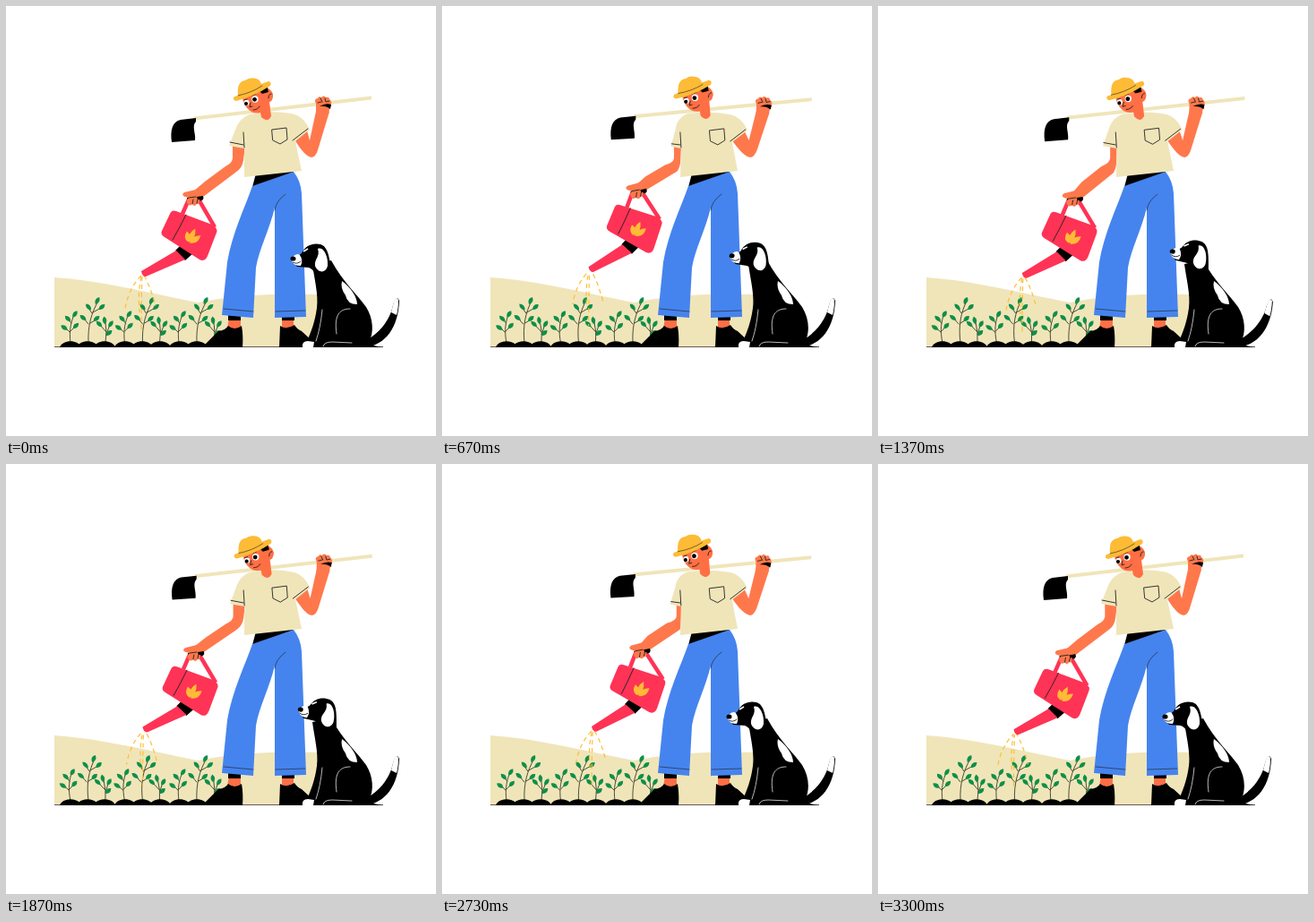
These frames come from a looping animation (480 by 480 pixels, 3.33 s). An HTML page:

```html
<!DOCTYPE html>
<html lang="en">
<head>
<meta charset="utf-8">
<title>Gardener and dog</title>
<style>
html, body { margin: 0; width: 100%; height: 100%; overflow: hidden; background: #fff; }
svg { display: block; width: 100vw; height: 100vh; }
.skin { fill: #ff6f45; }
.arm { fill: #ff784c; }
.cloth { fill: #f0e5b9; }
.blue { fill: #4584ee; }
.red { fill: #ff3355; }
.gold { fill: #fdbb36; }
.white { fill: #fff; }
.line { fill: none; stroke: #222; stroke-width: .9; stroke-linecap: round; stroke-linejoin: round; }
.pale { stroke: #ccc; }
.stem { stroke: #38402b; }
.leaf { fill: #0e8f49; }
#water path { fill: none; stroke: #fdbf35; stroke-width: 1.2; stroke-dasharray: 5 4; }
</style>
</head>
<body>
<svg viewBox="0 0 480 480">
  <path class="cloth" d="M54 303C103 306 154 319 214 331C250 324 292 320 350 322V380H54Z"/>
  <g id="plants"></g>
  <path d="M54 380.5H421" stroke="#6a5658"/>
  <g id="soil"></g>

  <g id="water">
    <path d="M151 301Q137 315 133 338"/>
    <path d="M151 302Q147 320 149 342"/>
    <path d="M152 302Q151 325 151 362"/>
    <path d="M154 301Q161 312 167 335"/>
  </g>

  <g id="hoe">
    <path class="cloth" d="M210 123.5L408 100.5V104.5L210 127.5Z"/>
    <path d="M212 125L195 127C186 129 183 138 185 152L211 150C212 142 207 134 212 129Z"/>
  </g>

  <!-- legs -->
  <path class="skin" d="M249 348H262V360H247ZM308 348H321V360H308Z"/>
  <path d="M248 345H262V351H248ZM308 345H322V351H308ZM219 381L237 363Q245 362 248 357Q255 363 263 357Q265 368 264 381ZM305 381L306 357Q313 362 322 356Q325 361 330 363L343 375L345 381Z"/>
  <path class="line" stroke-opacity=".4" d="M239 365L243 368M236 368L240 371M325 364L322 367M329 367L325 370"/>
  <path d="M279 187L275 202L321 186V183Z"/>
  <path class="blue" d="M275 201L321 185Q329 195 330 209L335 347L300 348V225C294 250 283 270 279 292L276 348L241 345L247 286C252 255 267 224 275 201Z"/>
  <path class="line" stroke-opacity=".7" d="M300 228Q301 218 312 210M243 338L276 341M301 341L334 340"/>

  <!-- upper body -->
  <path class="arm" id="armL"/>
  <path class="arm" id="armR"/>
  <path class="cloth" id="shirt"/>
  <path class="line" id="seams"/>

  <g id="head">
    <path class="skin" d="M264 103L291 91Q298 94 298 101Q297 107 294 107L296 123Q292 131 285 124L284 119Q276 121 270 115Q265 110 264 103Z"/>
    <path d="M281 93L291 88L293 96L286 98Z"/>
    <path class="skin" d="M291 98Q297 92 298 100Q297 107 292 107Z"/>
    <ellipse class="white" cx="268.5" cy="108" rx="3" ry="3.3"/>
    <ellipse class="white" cx="278" cy="104" rx="3.7" ry="3.7"/>
    <circle cx="268" cy="109" r="2.1"/>
    <circle cx="277.5" cy="104.3" r="2.4"/>
    <path class="line" d="M273 108L272 113L275 112M276 116Q281 116 283 112M266 105L269 104M275 100L279 98M293 103Q293 98 296 98"/>
    <path class="gold" d="M259 100C258 88 261 84 267 83Q271 80 275 80.500Q283 80 285 87L293 84Q297 85 295 89Q277 101 257 106Q252 105 255 101Z"/>
    <path class="line" stroke-opacity=".65" d="M259 100Q274 97 286 89"/>
  </g>

  <g id="fist">
    <path class="arm" d="M346 109Q343 104 348 103Q349 100 352 102Q355 99 357 102Q361 101 361 104Q365 107 362 112L360 120H346Z"/>
    <path class="line" d="M348 108L352 107M351 103L353 107M356 103L357 107L361 106"/>
    <path d="M350 112Q357 108 363 110L362 115Q357 111 350 112Z"/>
  </g>

  <g id="can">
    <path d="M197 232L204 216H215L233 247" fill="none" stroke="#ff3355" stroke-width="4.500" stroke-linejoin="round"/>
    <path d="M189 273L195 267L209 276L200 284Z"/>
    <path class="red" d="M190 273L200 283L156 302Q152 302 151 296Z"/>
    <path class="red" d="M190 229L230 244Q237 248 235 253L225 279Q222 286 216 283L177 258Q172 255 174 251L183 232Q185 227 190 229Z"/>
    <path class="line" d="M201 233Q193 249 186 261"/>
    <path class="gold" transform="rotate(28 208 257)" d="M208 265Q201 257 207 248Q213 257 208 265ZM207 265Q199 264 200 255Q208 256 207 265ZM209 265Q207 256 216 252Q218 262 209 265Z"/>
    <path d="M202 214L219 212Q222 214 219 217L204 219Z"/>
    <path class="arm" d="M220 210L212 205L199 208Q195 211 200 213L204 214Q200 218 203 221Q205 224 208 221Q210 225 213 221Q216 222 216 217Z"/>
    <path class="line" d="M204 214L212 213M208 221L209 216M213 220L214 216"/>
    <path d="M213 213L220 212L219 216L214 216Z"/>
  </g>

  <!-- dog -->
  <g id="tail">
    <path d="M400 381C424 379 438 358 439 329Q436 321 432 334C429 350 416 367 400 374Z"/>
    <path class="white" d="M438 328Q435 322 432 334L430 342L436 345Q438 338 438 328Z"/>
  </g>
  <path d="M342 288C344 304 349 322 347 337C345 353 340 365 336 374L333 381H421Q410 380 405 376C411 364 410 349 402 336C392 322 376 308 363 284Z"/>
  <path class="white" d="M375 307C385 314 392 325 392 333Q381 333 379 323Q373 315 375 307ZM331 381Q330 374 337 374L344 375L343 381Z"/>
  <path class="line pale" d="M353 339Q351 360 346 374M369 366C366 345 372 338 384 338M354 380Q355 375 364 375L386 376"/>
  <g id="dogHead">
    <path d="M330 276C334 267 343 264 351 266C360 269 361 281 364 300H346Q342 293 338 292L325 291Q319 285 330 276Z"/>
    <path class="white" d="M320 280Q325 275 328 278Q332 284 329 290Q321 290 319 285Z"/>
    <ellipse cx="320.5" cy="282" rx="3" ry="2.6"/>
    <path class="line" d="M320 286Q325 289 329 285"/>
    <path class="white" d="M348 271C355 268 360 281 359 290C357 299 348 298 345 290C344 282 351 280 348 271Z"/>
    <path d="M332 274L337 271" stroke="#fff" stroke-width="1.6"/>
  </g>
</svg>
<script>
const LOOP = 3330, TAU = Math.PI * 2;
const $ = id => document.getElementById(id);
const move = (id, value) => $(id).setAttribute('transform', value);
const shape = (id, d) => $(id).setAttribute('d', d);

// Each plant: base x, stem, leaves as [x, y, angle] relative to the base
const plants = [
  [72, 'M0 0C-2-14 1-25 4-31M-1-12L-6-17M0-13L5-18M1-22L-3-26',
    [[5, -32, -55], [-3, -27, 45], [-7, -17, 35], [6, -19, -45]]],
  [92, 'M0 0C-1-20 4-34 10-45M0-21L-5-27M2-22L9-26M4-33L0-39M5-34L14-39',
    [[10, -47, -60], [0, -40, 50], [15, -40, -40], [-6, -28, 40], [9, -27, -40]]],
  [111, 'M0 0Q2-12 0-23M1-12L-6-20M1-10L5-20',
    [[-1, -25, -95], [-7, -21, 45], [6, -21, -55], [4, -11, -40]]]
];
const leaf = ([x, y, angle]) =>
  `<path class="leaf" d="M-4.5 0Q0-4.6 4.5 0Q0 4.6-4.5 0" transform="translate(${x} ${y}) rotate(${angle})"/>`;
const stems = [];
for (let row = 0; row < 3; row++) {
  for (const [x, stem, leaves] of plants) {
    const g = document.createElementNS('http://www.w3.org/2000/svg', 'g');
    g.innerHTML = `<path class="line stem" d="${stem}"/>` + leaves.map(leaf).join('');
    $('plants').append(g);
    stems.push({ g, x: x + row * 60.5, sway: row < 2 ? 1 : .1 });
  }
}
$('soil').innerHTML = [72, 91, 110, 133, 152, 172, 194, 213]
  .map(x => `<path d="M${x - 12} 381C${x - 9} 372 ${x + 9} 372 ${x + 12} 381Z"/>`).join('');

// Blend the numbers of two matching paths
function mix(a, b, k) {
  const to = b.match(/[\d.]+/g);
  let i = 0;
  return a.replace(/[\d.]+/g, v => +v + (to[i++] - v) * k);
}

// Closed Catmull-Rom curve through evenly spaced values
function cycle(values, phase) {
  const n = values.length, u = phase * n, i = Math.floor(u), f = u - i;
  const [a, b, c, d] = [-1, 0, 1, 2].map(k => values[(i + k + n) % n]);
  return b + f / 2 * (c - a + f * (2 * a - 5 * b + 4 * c - d + f * (3 * (b - c) + d - a)));
}

function ease(t, from, to) {
  const u = Math.min(1, Math.max(0, (t - from) / (to - from)));
  return u * u * (3 - 2 * u);
}

function draw(t) {
  const phase = t / (LOOP / 2) % 1;
  const s = (1 - Math.cos(TAU * phase)) / 2;
  const x = cycle([0, 1.7, 6, 11, 12, 8.2], phase);
  const y = cycle([0, -4, -7, -8, -5, 1.2], phase);
  const k = x / 12.5, turn = -3.2 * s, rad = turn * Math.PI / 180;

  move('hoe', `translate(${5 * s} ${-.5 * s}) rotate(${1.3 * s} 297 114)`);
  move('fist', `translate(${5.5 * s} ${.5 * s}) rotate(${1.3 * s} 354 107)`);
  move('head', `translate(${5 * s} ${-2 * s}) rotate(${2.3 * s} 275 100)`);
  move('can', `translate(${x} ${y}) rotate(${turn} 211 213)`);

  // The spray starts at the turned spout tip
  const px = -59, py = 87, cos = Math.cos(rad), sin = Math.sin(rad);
  move('water', `translate(${x + px * cos - py * sin - px} ${y + px * sin + py * cos - py})`);
  $('water').style.strokeDashoffset = -t * 9 * 22 / LOOP;

  shape('armL', `M${253 + 9 * k} 154V170Q${253 + 9 * k} 175 ${245 + 6 * k} ${179 + .2 * y}
    L${222 + .6 * x} ${196 + .7 * y}L${209 + x} ${207 + y}L${220 + x} ${213 + y}
    L${256 + 10 * k} ${186 + .2 * y}Q${264 + 3 * k} ${181 + .2 * y} ${265 + 2 * k} 172L267 156Z`);
  shape('armR', mix(
    'M322 149C329 160 335 168 341 169Q346 168 348 161L361 118L347 113L339 150L336 139Z',
    'M324 150C332 161 338 168 345 169Q349 168 352 161L366 119L352 114L343 150L338 140Z', s));
  shape('shirt', mix(
    'M272 121C263 125 259 130 256 138L249 156L266 159L266 191L330 184L323 151L339 138C335 130 330 122 318 120Q296 116 272 121Z',
    'M275 120C266 123 262 130 261 138L256 157L267 159L266 191L330 184L324 152L341 139C338 131 332 123 321 121Q299 117 275 120Z', s));
  shape('seams', mix(
    'M250 152L265 155M265 141L266 158M320 150L337 137M297 138L313 136L314 149L306 154L298 150Z',
    'M257 154L266 155M266 141L267 158M322 151L339 138M299 139L315 137L316 150L308 155L300 151Z', s));

  const up = ease(t, 500, 900) - ease(t, 2050, 2550);
  move('dogHead', `translate(${5 * up} ${-2 * up}) rotate(${9 * up} 360 300)`);
  const wag = t > 1120 && t < 1870 ? (1 - Math.cos(TAU * (t - 1120) / 375)) / 2 : 0;
  move('tail', `rotate(${3 * wag} 404 378)`);

  const lean = 4.9 * (ease(t, 200, 900) - ease(t, 1900, 2900));
  for (const { g, x, sway } of stems)
    g.setAttribute('transform', `translate(${x} 376) skewX(${lean * sway})`);
}

const start = performance.now();
function tick() {
  draw((performance.now() - start) % LOOP);
  requestAnimationFrame(tick);
}
tick();
</script>
</body>
</html>
```
